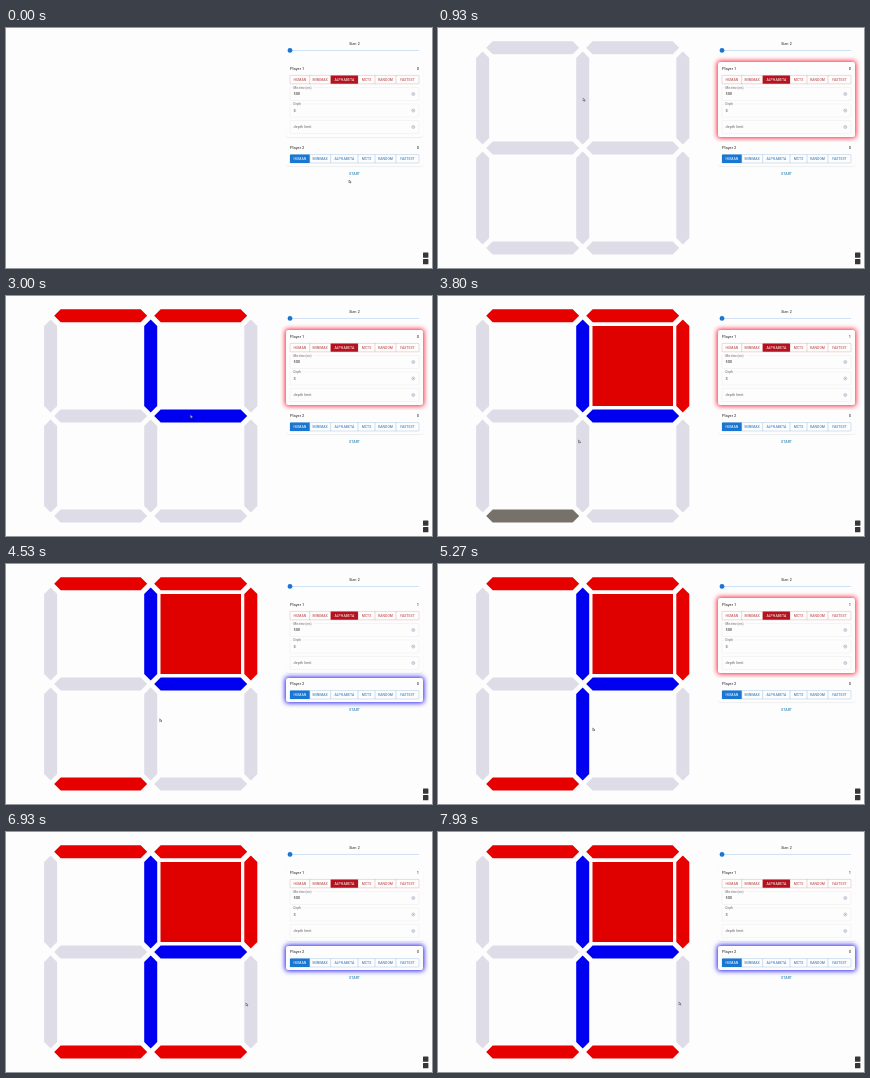
These frames come from a looping animation (426x240 px, 8000 ms). An HTML page:

```html
<!DOCTYPE html>
<html lang="en">
<head>
<meta charset="utf-8">
<title>Dots and boxes</title>
<style>
  html, body { margin: 0; width: 100%; height: 100%; overflow: hidden; background: #fdfdfd; }
  #stage { position: absolute; left: 0; top: 0; width: 426px; height: 240px; overflow: hidden; }
  svg { position: absolute; left: 0; top: 0; }
  text { font-family: Roboto, Arial, sans-serif; }
  .card { position: absolute; left: 280px; width: 137px; border-radius: 2px; background: #fdfdfd;
          box-shadow: 0 .5px 1px rgba(0, 0, 0, .1); }
  #card1 { top: 34px; height: 75px; }
  #card2 { top: 114px; height: 24px; }
  #card1.active { box-shadow: 0 0 5px 1px #ff2038; }
  #card2.active { box-shadow: 0 0 5px 1px #2a20f0; }
</style>
</head>
<body>
<div id="stage">
  <div class="card" id="card1"></div>
  <div class="card" id="card2"></div>
  <svg id="scene" width="426" height="240" viewBox="0 0 426 240"></svg>
</div>
<script>
const LOOP = 8000, STEP = 8000 / 120;
const RED = '#e60000', BLUE = '#0000f0', IDLE = '#dddce7', PENDING = '#77716b';
const scene = document.getElementById('scene');
const cards = [1, 2].map(n => document.getElementById('card' + n));

function add(tag, attrs, parent = scene) {
  const el = document.createElementNS('http://www.w3.org/2000/svg', tag);
  for (const key in attrs) el.setAttribute(key, attrs[key]);
  parent.appendChild(el);
  return el;
}

function label(x, y, str, size, fill = '#222', anchor = 'start') {
  const el = add('text', { x, y, fill, 'font-size': size, 'text-anchor': anchor });
  el.textContent = str;
  return el;
}

const line = (x1, y1, x2, y2, stroke) => add('line', { x1, y1, x2, y2, stroke, 'stroke-width': .5 });

// Board
const board = add('g', {});
const edges = {};
function edge(name, cx, cy, vertical) {
  edges[name] = add('path', {
    d: 'M-46.5 0L-40-6.5H40L46.5 0L40 6.5H-40Z',
    transform: `translate(${cx} ${cy}) rotate(${vertical ? 90 : 0})`
  }, board);
}
for (let i = 0; i < 3; i++) {
  for (let j = 0; j < 2; j++) {
    edge(`h${i}${j}`, 94.7 + 100 * j, 19.7 + 100.2 * i, false);
    edge(`v${j}${i}`, 44.6 + 100.1 * i, 70 + 100 * j, true);
  }
}
const box = add('rect', { x: 154.5, y: 30, width: 80.5, height: 80, fill: '#df0000' }, board);

// Size slider
label(348.5, 17.3, 'Size: 2', 3.7, '#222', 'middle');
line(284, 22.5, 413, 22.5, '#a3c5e8');
add('circle', { cx: 284, cy: 22.4, r: 2.4, fill: '#1976d2' });

// Player panels
const choices = ['HUMAN', 'MINIMAX', 'ALPHABETA', 'MCTS', 'RANDOM', 'FASTEST'];
const stops = [284, 303.7, 324.7, 352, 369, 390, 413];
function panel(number, y, main, dark, picked) {
  label(284, y, 'Player ' + number, 4);
  const score = label(413, y, '0', 4, '#222', 'end');
  const top = y + 5.2;
  add('rect', { x: 284, y: top, width: 129, height: 8.4, rx: .8, fill: 'none', stroke: main,
                'stroke-opacity': .5, 'stroke-width': .4 });
  choices.forEach((name, i) => {
    const x = stops[i], width = stops[i + 1] - x, on = i === picked;
    if (i) line(x, top, x, top + 8.4, main).setAttribute('stroke-opacity', .45);
    if (on) add('rect', { x, y: top, width, height: 8.4, rx: .5, fill: dark });
    label(x + width / 2, top + 5.5, name, 3.55, on ? '#fff' : main, 'middle');
  });
  return score;
}
const score1 = panel(1, 42.2, '#b94343', '#b5121f', 2);
panel(2, 121.4, '#2c76ba', '#1976d2', 0);

function field(y, title, value) {
  add('rect', { x: 284, y: y - 6.5, width: 129, height: 13, rx: 1, fill: 'none', stroke: '#e5e5e9', 'stroke-width': .4 });
  if (title) {
    add('rect', { x: 287, y: y - 8, width: title.length * 1.5 + 1, height: 3, fill: '#fdfdfd' });
    label(287.5, y - 5.5, title, 2.9, '#666');
  }
  label(287.5, y + 1.3, value, 3.8, title ? '#222' : '#666');
  add('circle', { cx: 407.3, cy: y, r: 1.5, fill: 'none', stroke: '#8299b0', 'stroke-width': .5 });
  line(406.6, y, 408, y, '#777');
}
field(66, 'Min time (ms)', '500');
field(82.5, 'Depth', '3');
field(99, '', 'depth limit');

label(348.5, 147.3, 'START', 3.7, '#1976a8', 'middle');
for (const y of [224.5, 231]) add('rect', { x: 417, y, width: 5.4, height: 5.2, rx: .5, fill: '#37373b' });

const cursor = add('path', { d: 'M0 0L0 2.8L.8 2.1L1.3 3.1L1.8 2.8L1.3 1.9L2.2 1.9Z', fill: '#fff', stroke: '#444', 'stroke-width': .5 });

// Timeline
const START = 530, BOX_AT = 3530;
const moves = [
  ['h00', 1130, RED], ['v01', 1930, BLUE], ['h01', 2470, RED], ['h11', 3000, BLUE],
  ['v02', BOX_AT, RED], ['h20', 3930, RED], ['v11', 5000, BLUE], ['h21', 5530, RED]
];
const turns = [[START, 0], [1130, 1], [1930, 0], [2470, 1], [3000, 0], [3930, 1], [5000, 0], [5530, 1]];
const path = [
  [0, 343, 152], [400, 343, 149], [930, 137, 67], [1900, 146, 70], [2200, 158.5, 98],
  [2950, 185, 119], [3200, 180, 120], [3800, 140.5, 144], [4530, 154, 155],
  [4950, 146, 162], [5300, 155, 164], [6000, 215, 167], [6900, 240, 171], [8000, 241, 170]
];

function cursorAt(t) {
  const i = Math.max(1, path.findIndex(p => p[0] > t));
  const [t0, x0, y0] = path[i - 1], [t1, x1, y1] = path[i];
  const u = (t - t0) / (t1 - t0), k = u * u * (3 - 2 * u);
  return [x0 + (x1 - x0) * k, y0 + (y1 - y0) * k];
}

function draw(t) {
  board.style.display = t < START ? 'none' : '';
  for (const name in edges) edges[name].setAttribute('fill', IDLE);
  for (const [name, at, color] of moves) {
    if (t >= at) edges[name].setAttribute('fill', color);
    else if (color === RED && t >= at - 150) edges[name].setAttribute('fill', PENDING);
  }
  box.style.display = t < BOX_AT ? 'none' : '';
  score1.textContent = t < BOX_AT ? '0' : '1';
  const turn = turns.filter(([at]) => at <= t).pop();
  cards.forEach((card, i) => card.classList.toggle('active', !!turn && turn[1] === i));
  cursor.setAttribute('transform', `translate(${cursorAt(t)})`);
}

const begin = performance.now();
function tick() {
  const t = (performance.now() - begin) % LOOP;
  draw(Math.floor(t / STEP + .01) * STEP % LOOP);
  requestAnimationFrame(tick);
}
tick();
</script>
</body>
</html>
```
